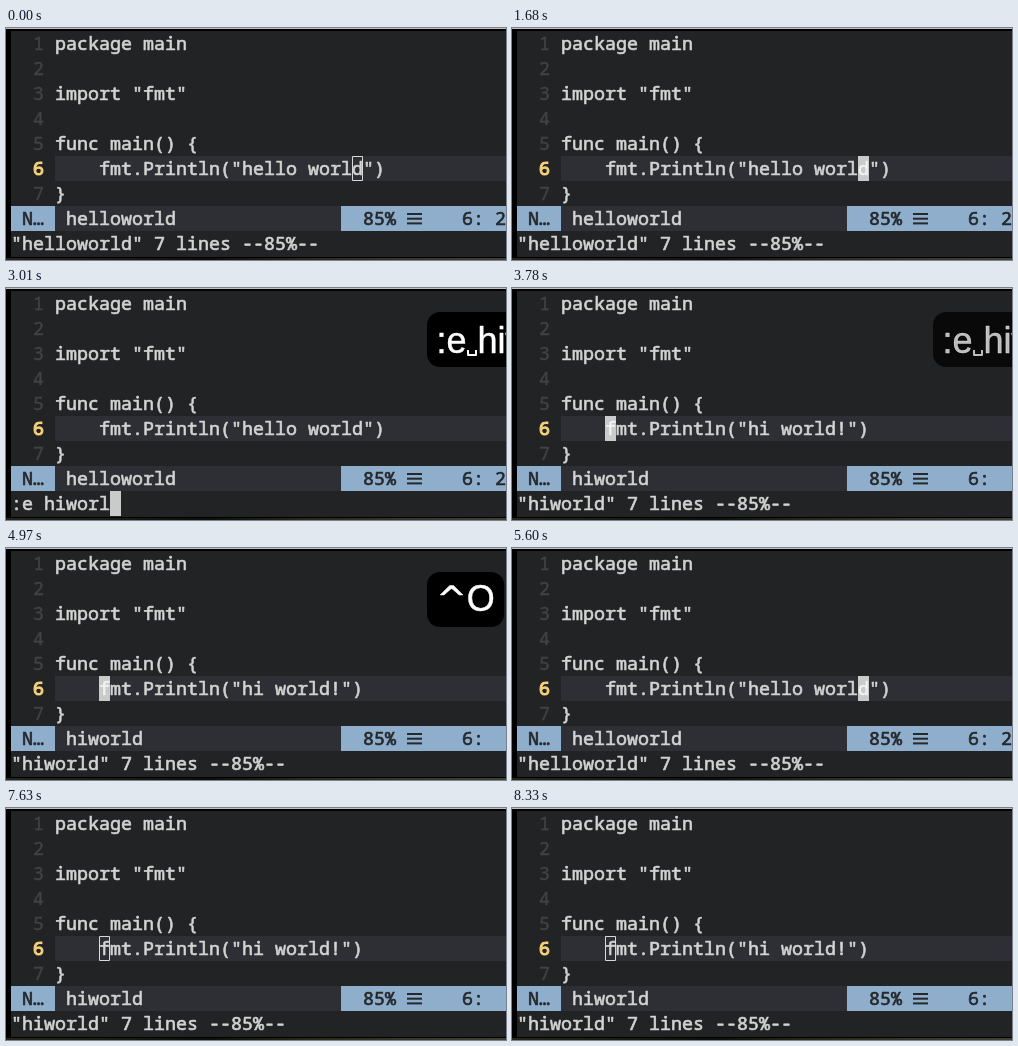
These frames come from a looping animation (500x232 px, 8400 ms). An HTML page with a canvas:

```html
<!DOCTYPE html>
<html lang="en">
<head>
<meta charset="utf-8">
<style>
  html, body { margin: 0; width: 500px; height: 232px; overflow: hidden; background: #000; }
  canvas { display: block; }
</style>
</head>
<body>
<canvas id="stage" width="500" height="232"></canvas>
<script>
const ctx = document.getElementById('stage').getContext('2d');
const LOOP = 8400, TICK = 70;
const LEFT = 5, TOP = 3, CELL = 11, ROW = 25, BASELINE = 19;
const MONO = '18.33px "Noto Sans Mono", "DejaVu Sans Mono", monospace';
const BG = '#222325', LINE = '#2d2f34', FG = '#d2d4d2', BLUE = '#8eaecb',
      DARK = '#25282c', NUMBER = '#404346', YELLOW = '#f5d27c';

const hello = { name: 'helloworld', text: 'hello world', column: 27, position: '6: 2' };
const hi = { name: 'hiworld', text: 'hi world!', column: 4, position: '6:' };

// Command typed one character at a time: [time, character]
const keys = [[1960, ':'], [2100, 'e'], [2240, ' '], [2380, 'h'], [2520, 'i'], [2660, 'w'],
              [2800, 'o'], [2870, 'r'], [3010, 'l'], [3080, 'd']];
const ENTER = 3220, BACK = 5040, FORWARD = 6370;
const FOCUS = 1470, BLUR = 7630;

const typedAt = t => keys.filter(([time]) => time <= t).map(([, char]) => char).join('');

// Keystroke bubbles: visible from start, fading from fade over the given duration
const bubbles = [
  { start: 1960, fade: 3660, duration: 230, label: t => typedAt(t) },
  { start: 4900, fade: 5420, duration: 180, label: () => '^O' },
  { start: 6300, fade: 6820, duration: 180, label: () => '^I' }
];

function rect(x, y, w, h, color) {
  ctx.fillStyle = color;
  ctx.fillRect(x, y, w, h);
}

const cellX = col => LEFT + col * CELL;
const rowY = row => TOP + row * ROW;

// A thin stroke gives the text its semi-bold weight
function heavyText(text, x, y, color, weight) {
  ctx.fillStyle = ctx.strokeStyle = color;
  ctx.lineWidth = weight;
  ctx.lineJoin = 'round';
  ctx.fillText(text, x, y);
  ctx.strokeText(text, x, y);
}

function write(text, col, row, color, weight = 0.65) {
  ctx.font = MONO;
  heavyText(text, cellX(col), rowY(row) + BASELINE, color, weight);
}

function cursor(col, row, solid, char = '') {
  const x = cellX(col), y = rowY(row);
  if (solid) {
    rect(x, y, CELL, ROW, '#c9caca');
    write(char, col, row, '#f1f1f1');
  } else {
    ctx.strokeStyle = '#d8d9d8';
    ctx.lineWidth = 1;
    ctx.strokeRect(x + 0.5, y + 0.5, CELL - 1, ROW - 1);
  }
}

function drawWindow() {
  rect(0, 0, 500, 232, '#000');
  rect(0, 0, 500, 1, '#c0c0c0');
  rect(LEFT, TOP, 495, 226, BG);
  const ground = ctx.createLinearGradient(0, 0, 500, 0);
  ['#26271a', '#1c1e12', '#0e0f09', '#2a2a18', '#36372a', '#404132']
    .forEach((color, i) => ground.addColorStop(i / 5, color));
  rect(0, 230, 500, 2, ground);
}

function drawStatus(file) {
  rect(LEFT, rowY(7), 4 * CELL, ROW, BLUE);
  rect(cellX(4), rowY(7), 26 * CELL, ROW, LINE);
  rect(cellX(30), rowY(7), 165, ROW, BLUE);
  write('N…', 1, 7, DARK);
  write(file.name, 5, 7, FG);
  write('85%', 32, 7, DARK);
  for (let i = 0; i < 3; i++) rect(401, 185 + i * 4.7, 15, 2, DARK);
  write(file.position, 41, 7, DARK);
}

function drawEditor(file) {
  const lines = ['package main', '', 'import "fmt"', '', 'func main() {',
                 `    fmt.Println("${file.text}")`, '}'];
  rect(cellX(4), rowY(5), 451, ROW, LINE);
  lines.forEach((line, row) => {
    if (row === 5) write(row + 1, 2, row, YELLOW, 1.2);
    else write(row + 1, 2, row, NUMBER, 0.4);
    write(line, 4, row, FG);
  });
  return lines[5][file.column];
}

function drawBubble(label, alpha) {
  const left = 421, padding = 9.5;
  const baseline = label[0] === '^' ? 62.5 : 65;
  const advance = char => {
    ctx.font = char === '^' ? '36px "DejaVu Sans", sans-serif'
                            : '36px "Liberation Sans", Arial, sans-serif';
    return char === ' ' ? 11 : ctx.measureText(char).width;
  };
  const width = [...label].reduce((sum, char) => sum + advance(char), 2 * padding);
  ctx.save();
  ctx.globalAlpha = alpha;
  ctx.fillStyle = '#000';
  ctx.beginPath();
  ctx.roundRect(left, 24, width, 55, 13);
  ctx.fill();
  let x = left + padding;
  for (const char of label) {
    const step = advance(char);
    if (char === ' ') {
      ctx.strokeStyle = '#fff';
      ctx.lineWidth = 2;
      ctx.beginPath();
      ctx.moveTo(x + 1.5, 62);
      ctx.lineTo(x + 1.5, 67);
      ctx.lineTo(x + 9.5, 67);
      ctx.lineTo(x + 9.5, 62);
      ctx.stroke();
    } else {
      heavyText(char, x, baseline, '#fff', 0.5);
    }
    x += step;
  }
  ctx.restore();
}

function draw(t) {
  const file = t < ENTER || (t >= BACK && t < FORWARD) ? hello : hi;
  const typing = t >= keys[0][0] && t < ENTER;

  drawWindow();
  const char = drawEditor(file);
  drawStatus(file);

  if (typing) {
    const command = typedAt(t);
    write(command, 0, 8, FG);
    cursor(command.length, 8, true);
  } else {
    write(`"${file.name}" 7 lines --85%--`, 0, 8, FG);
    cursor(4 + file.column, 5, t >= FOCUS && t < BLUR, char);
  }

  for (const { start, fade, duration, label } of bubbles) {
    const alpha = 1 - Math.max(0, (t - fade) / duration) ** 2;
    if (t >= start && alpha > 0) drawBubble(label(t), alpha);
  }
}

function frame() {
  const t = performance.now() % LOOP;
  draw(Math.floor(t / TICK) * TICK);
  requestAnimationFrame(frame);
}
frame();
</script>
</body>
</html>
```
